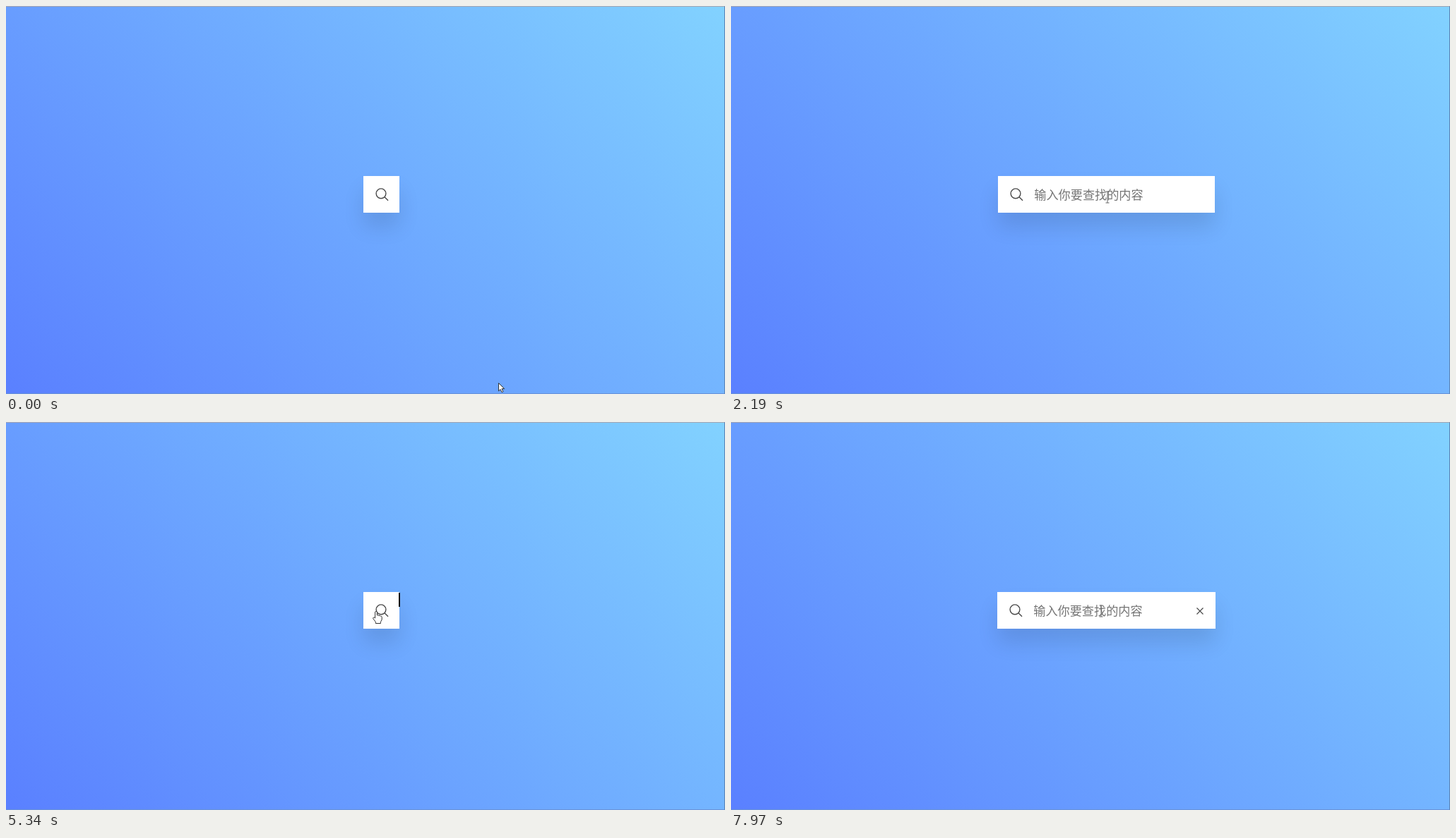
Animation, 1018 px wide and 550 px high, one loop 8000 ms. Source, as an HTML page:

```html
<!DOCTYPE html>
<html lang="zh-CN">
<head>
<meta charset="utf-8">
<title>Search box</title>
<style>
  html, body { margin: 0; width: 100%; height: 100%; overflow: hidden; }
  body { position: relative; background: linear-gradient(45deg, #5a80ff, #82d2ff); }
  body::after {
    content: ""; position: absolute; inset: 0; box-sizing: border-box;
    border: solid; border-width: 1px 1px 1px 0; border-color: #aaa7b0 #5a82b4 #6a93d8;
  }
  #box {
    position: absolute; top: 241px; height: 52px;
    background: #fff; box-shadow: 0 20px 30px rgba(0, 0, 0, .11);
  }
  #box > * { position: absolute; }
  #field {
    left: 51px; right: 51px; top: 0; height: 100%; overflow: hidden; white-space: nowrap;
    font: 17.15px/51px "Noto Sans CJK SC", "Noto Sans CJK", sans-serif; color: #757575;
  }
  #caret { left: 51px; top: 16px; width: 1px; height: 20px; background: #777; }
  #caret.shut { left: 50.5px; top: 1px; width: 1.5px; background: #111; }
  svg { fill: none; stroke: #4a4a4a; stroke-width: 1.4; overflow: visible; }
  #glass { left: 0; top: 0; }
  #close { right: 21px; top: 26.5px; stroke-width: 1.2; }
  #pointer { position: absolute; left: 0; top: 0; stroke: #333; stroke-width: 1; }
  #arrow, #hand { fill: #fff; stroke-linejoin: round; }
</style>
</head>
<body>
<div id="box">
  <svg id="glass" width="1" height="1"><circle cx="25" cy="24.8" r="6.9"/><path d="M30 29.8l5 5"/></svg>
  <div id="field">输入你要查找的内容</div>
  <div id="caret"></div>
  <svg id="close" width="1" height="1"><path id="cross" d="M-4.5-4.5l9 9M4.5-4.5l-9 9"/></svg>
</div>
<svg id="pointer" width="1" height="1">
  <path id="arrow" d="M.5.5V11.8L3.1 9.4 5 13.6 6.9 12.7 5 8.6H8.6Z"/>
  <path id="hand" d="M-1.4 10V1.2Q0-.6 1.4 1.2V6Q3 5 4 6.6Q5.5 5.8 6.4 7.2Q8 6.8 8.2 8.6V12L6.4 15.5V17.5H-.6V15.5L-4.4 10.4Q-4.2 8.4-2.4 9.2Z"/>
  <path id="beam" stroke="#666" d="M-2.5-8H2.5M0-8V8M-2.5 8H2.5"/>
</svg>
<script>
const $ = id => document.getElementById(id);
const show = (id, on) => $(id).style.display = on ? "" : "none";
const clamp = v => Math.min(1, Math.max(0, v));

const LOOP = 8000, CENTER = 531.6, SMALL = 51.6, WIDE = 308.6;
const DURATION = 500, BLINK = 530;
const OPEN = 1750, CLOSE = 4312, FOCUS = 5290, REOPEN = 5730;

// Pointer glides: start, end, x, y reached
const glides = [
  [710, 1220, 582, 290],
  [1220, 1510, 533, 271],
  [3490, 4080, 663, 268],
  [4550, 5180, 524, 268],
];

// CSS "ease", cubic-bezier(.25, .1, .25, 1), solved by bisection
function ease(p) {
  const curve = (s, a, b) => 3 * s * (1 - s) ** 2 * a + 3 * s * s * (1 - s) * b + s ** 3;
  let lo = 0, hi = 1;
  for (let i = 0; i < 24; i++) {
    const mid = (lo + hi) / 2;
    if (curve(mid, .25, .25) < p) lo = mid; else hi = mid;
  }
  return curve(lo, .1, 1);
}
const transition = (t, start) => ease(clamp((t - start) / DURATION));

// The close icon follows the box after a delay when opening, at once when closing.
const opened = (t, delay) =>
  transition(t, OPEN + delay) - transition(t, CLOSE) + transition(t, REOPEN + delay);

function pointerAt(t) {
  let x = 697, y = 534;
  for (const [start, end, toX, toY] of glides) {
    const k = clamp((t - start) / (end - start));
    x += (toX - x) * k;
    y += (toY - y) * k;
  }
  return [x, y];
}

function caretOn(t) {
  const blink = since => Math.floor((t - since) / BLINK) % 2 === 0;
  return t >= FOCUS ? blink(FOCUS) : t >= OPEN && t < CLOSE && blink(1470);
}

function draw(t) {
  const open = opened(t, 0), cross = opened(t, DURATION);
  const width = SMALL + (WIDE - SMALL) * open;
  const left = CENTER - width / 2, right = left + width;
  $("box").style.left = left + "px";
  $("box").style.width = width + "px";
  $("cross").setAttribute("transform", `scale(${cross})`);
  show("close", cross > .01);
  show("field", open > .01);
  show("caret", caretOn(t));
  $("caret").className = open < .01 ? "shut" : "";

  const [x, y] = pointerAt(t);
  const inside = x > left && x < right && y > 241 && y < 293;
  const overField = x > left + 51 && x < right - 51;
  const kind = !inside ? "arrow" : overField ? "beam" : "hand";
  for (const id of ["arrow", "hand", "beam"]) show(id, id === kind);
  $("pointer").style.transform = `translate(${x}px, ${y}px)`;
}

function frame() {
  draw(performance.now() % LOOP);
  requestAnimationFrame(frame);
}
frame();
</script>
</body>
</html>
```
